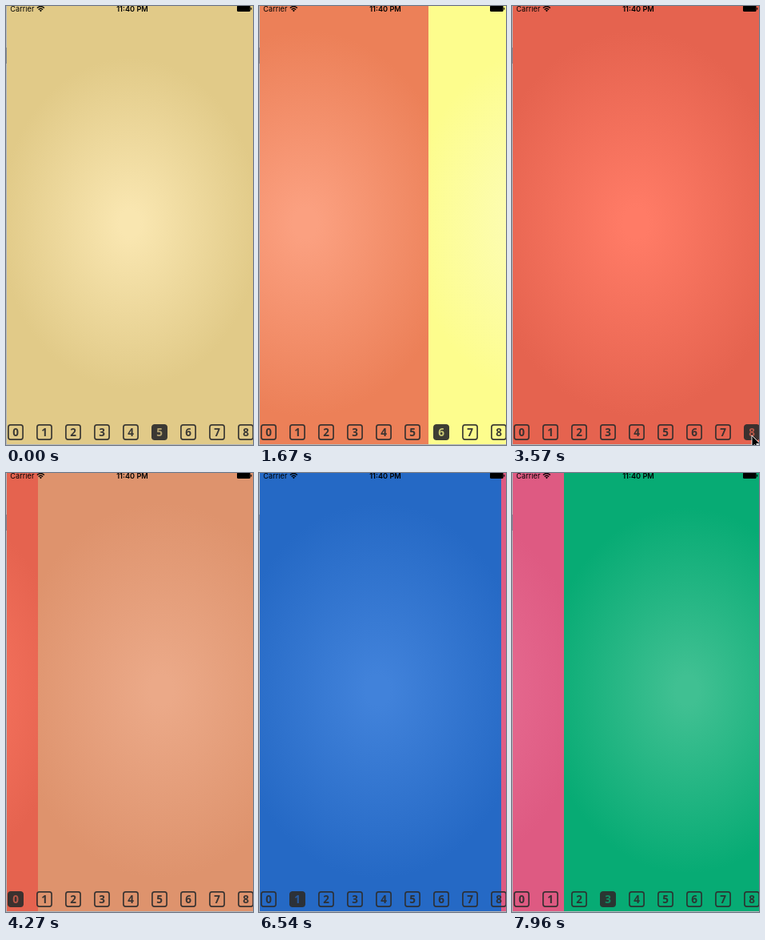
Recreate the animation shown at these times as an HTML page. Size 309 by 549 pixels, loop 8000 ms.

```html
<!DOCTYPE html>
<html lang="en">
<head>
<meta charset="utf-8">
<title>Colour pager</title>
<style>
  html, body { margin: 0; width: 100%; height: 100%; overflow: hidden; }
  body { background: linear-gradient(#b3b7bb 52px, #7f8794 52px 72px, #b3b7bb 72px); }
  svg { display: block; width: 100vw; height: 100vh; }
  .status { font-family: Inter, Roboto, sans-serif; font-size: 9.2px; }
  .digit { font: 700 13.5px "Open Sans", "Noto Sans", sans-serif; text-anchor: middle; }
  .ink { fill: #2d2d2d; }
  .cell { opacity: .92; }
  .cell .on, .cell.sel .off { display: none; }
  .cell.sel .on { display: inline; }
</style>
</head>
<body>
<svg viewBox="0 0 309 549" preserveAspectRatio="none">
  <defs id="defs">
    <clipPath id="screen"><rect x="1" width="308" height="548"/></clipPath>
  </defs>
  <g clip-path="url(#screen)"><g id="strip"></g></g>
  <g id="cells"></g>
  <g class="status">
    <text x="5.3" y="7">Carrier</text>
    <g fill="none" stroke="#000" stroke-width="1.3">
      <path d="M38.9 2.6Q43.4 -1.6 47.9 2.6"/>
      <path d="M40.6 4.5Q43.4 1.9 46.2 4.5"/>
    </g>
    <path d="M41.8 5.6Q43.4 4.3 45 5.6L43.4 7.3Z"/>
    <text x="158" y="7" text-anchor="middle" font-weight="600">11:40 PM</text>
    <rect x="289" y="-.5" width="16.6" height="7.5" rx="1.5"/>
    <rect x="306.2" y="2" width="1.1" height="2.8" rx=".5"/>
  </g>
  <path id="cursor" d="M0 0V14.5L3.4 11.4 5.7 16.6 8 15.6 5.8 10.5H10.4Z"
        stroke="#fff" stroke-width=".9"/>
</svg>
<script>
const LOOP = 8000, WIDTH = 308, TICK = 115, SLIDE = 300;
const $ = id => document.getElementById(id);

// digit, centre colour, edge colour, gradient radius
const pages = [
  [5, '#f9e6b0', '#e1ca88', 163],
  [6, '#fba080', '#ec8058', 190],
  [7, '#fcfcbc', '#fdfd8d', 175],
  [8, '#ff7b66', '#e5634f', 190],
  [0, '#eba988', '#de936d', 185],
  [1, '#4182da', '#2569c5', 185],
  [2, '#e97196', '#de5a82', 180],
  [3, '#40c092', '#07ab74', 180]
];

// first visible step and true start of each slide, in ms
const slides = [
  [350, 313], [1670, 1553], [2860, 2788], [4040, 4044],
  [5350, 5260], [6540, 6510], [7840, 7750]
];

pages.forEach(([, inner, outer, r], i) => {
  $('defs').innerHTML += `
    <radialGradient id="g${i}" gradientUnits="userSpaceOnUse" cx="0" cy="0" r="${r}"
        gradientTransform="translate(${i * WIDTH + 155} 272) scale(1 1.27)">
      <stop offset=".08" stop-color="${inner}"/>
      <stop offset="1" stop-color="${outer}"/>
    </radialGradient>`;
  $('strip').innerHTML +=
    `<rect x="${i * WIDTH + 1}" width="${WIDTH + .3}" height="548" fill="url(#g${i})"/>`;
});

for (let d = 0; d < 9; d++) {
  const x = 12 + d * 36;
  const digit = fill => `<text class="digit" x="${x}" y="538" fill="${fill}">${d}</text>`;
  const box = (inset, radius, attrs) => `<rect x="${x - 10 + inset}" y="${523 + inset}"
    width="${20 - 2 * inset}" height="${20 - 2 * inset}" rx="${radius}" ${attrs}/>`;
  $('defs').innerHTML += `<mask id="m${d}" maskUnits="userSpaceOnUse"
    x="${x - 12}" y="520" width="24" height="26">${box(0, 3.5, 'fill="#fff"')}${digit('#444')}</mask>`;
  $('cells').innerHTML += `<g class="cell">
    <g class="off">${box(.9, 2.8, 'fill="none" stroke="#2d2d2d" stroke-width="1.7"')}${digit('#2d2d2d')}</g>
    <g class="on">${box(0, 3.5, `class="ink" mask="url(#m${d})"`)}</g></g>`;
}
const cells = [...$('cells').children];

// ease-in-out: cubic-bezier(.42, 0, .58, 1)
function ease(x) {
  if (x <= 0) return 0;
  if (x >= 1) return 1;
  let lo = 0, hi = 1;
  for (let i = 0; i < 20; i++) {
    const u = (lo + hi) / 2, v = 1 - u;
    if (3 * v * v * u * .42 + 3 * v * u * u * .58 + u ** 3 < x) lo = u; else hi = u;
  }
  return lo * lo * (3 - 2 * lo);
}

// the picture refreshes only every TICK ms while sliding
function position(t) {
  return slides.reduce((sum, [first, start]) => {
    if (t < first) return sum;
    const at = first + Math.floor((t - first) / TICK) * TICK;
    return sum + ease((at - start) / SLIDE);
  }, 0);
}

function draw(now) {
  const t = now % LOOP, pos = position(t);
  $('strip').setAttribute('transform', `translate(${-Math.round(pos * WIDTH)} 0)`);
  const current = pages[Math.round(pos)][0];
  cells.forEach((cell, d) => cell.classList.toggle('sel', d === current));

  const step = Math.floor((t - 3570) / 117);
  $('cursor').setAttribute('visibility', step >= 0 && step < 4 ? 'visible' : 'hidden');
  $('cursor').setAttribute('transform', `translate(${300 + 2 * step} ${537 + 3 * step})`);
}

function frame() {
  draw(performance.now());
  requestAnimationFrame(frame);
}
frame();
</script>
</body>
</html>
```
